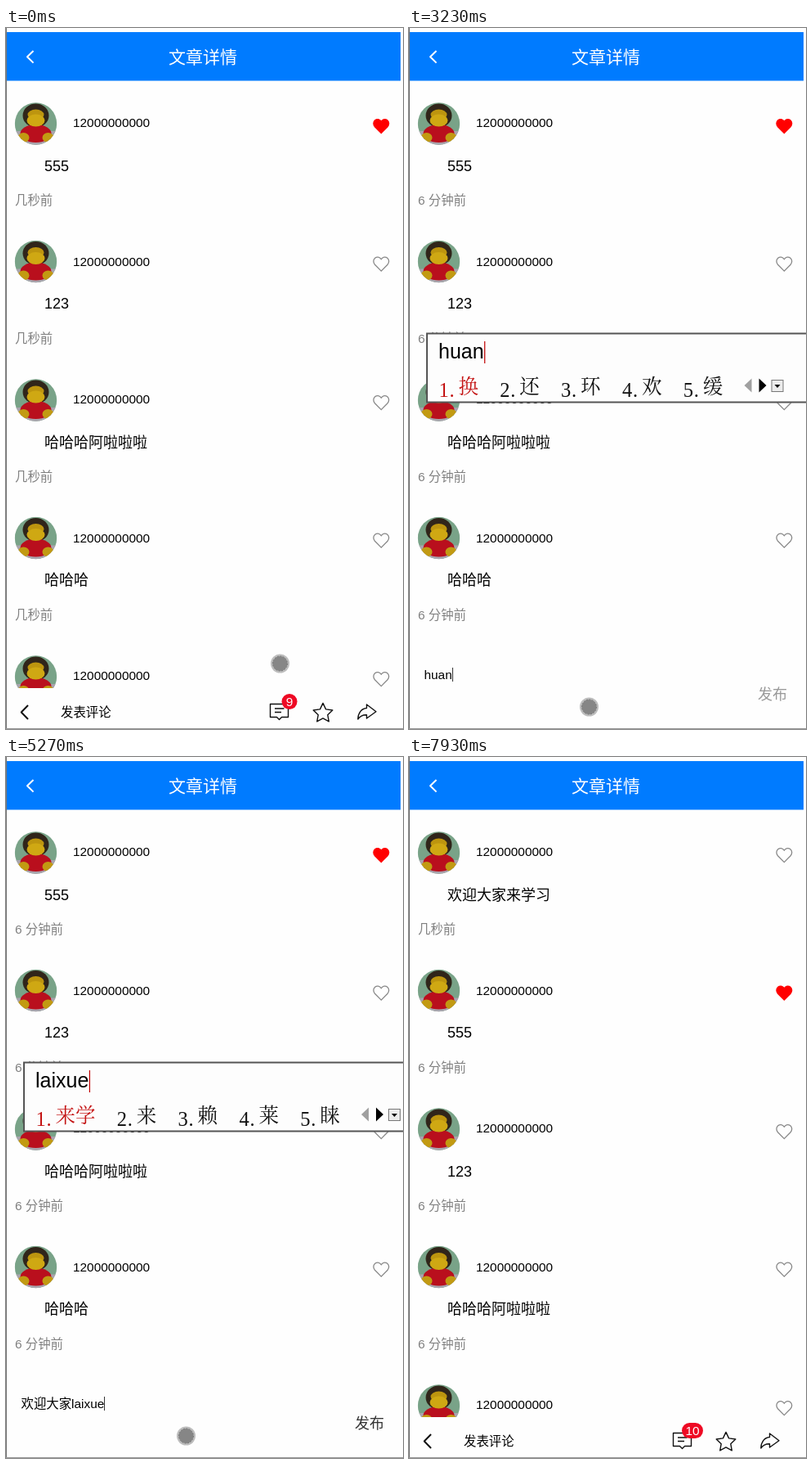
Write an HTML page that moves like this. It is 486 px wide and 857 px high and loops after 8000 ms.

```html
<!DOCTYPE html>
<html lang="zh-CN">
<head>
<meta charset="utf-8">
<style>
  html, body { margin: 0; width: 100%; height: 100%; overflow: hidden; background: #fefefe; }
  svg { display: block; width: 486px; height: 857px; }
  text { white-space: pre; font-family: "Liberation Sans", "Noto Sans CJK SC", "Noto Sans CJK", sans-serif; }
  .song { font-family: "Liberation Serif", "Noto Serif CJK SC", "Noto Sans CJK SC", serif; }
  .mono { font-family: "Liberation Mono", monospace; }
</style>
</head>
<body>
<svg id="stage" viewBox="0 0 486 857"></svg>
<script>
const LOOP = 8000;
const PITCH = 169;
const PHONE = '12000000000';
const SANS = '"Liberation Sans", "Noto Sans CJK SC", "Noto Sans CJK", sans-serif';
const HEART = 'M0 8.6L-7.8.7C-10-1.7-9.9-5.2-7.6-7.2C-5.2-9.2-1.9-8.6 0-5.9C1.9-8.6 5.2-9.2 7.6-7.2C9.9-5.2 10-1.7 7.8.7Z';
const stage = document.getElementById('stage');
const pen = document.createElement('canvas').getContext('2d');

// Each step overrides some fields of the state from its time on.
const ime = (keys, words) => ({ keys, words: words.split(' '), caret: true });
const shut = { keys: '', words: [] };
const steps = [
  [0, { cursor: [335.5, 777], age: ['几秒前', '几秒前'], typed: '', send: '#999', count: 9, ...shut }],
  [120, { cursor: [300, 793] }],
  [255, { cursor: [252, 815] }],
  [390, { cursor: [220.5, 830] }],
  [1530, { panel: true, age: ['5 分钟前', '6 分钟前'], caret: true, bar: 1 }],
  [1940, { bar: 0.4 }],
  [2090, { bar: 0, caret: false }],
  [2370, ime('h', '好 和 会 \\(^o^)/~ 后')],
  [2650, ime('hu', '湖 胡 户 护 虎')],
  [2800, ime('hua', '话 花 化 画 华')],
  [3230, { ...ime('huan', '换 还 环 欢 缓'), age: ['6 分钟前', '6 分钟前'] }],
  [3390, ime('huany', '欢迎 还有 换 还 环')],
  [3590, ime('huanying', '欢迎 幻影 换 还 环')],
  [3750, { ...shut, typed: '欢迎', send: '#777' }],
  [3900, { send: '#4c4c4c' }],
  [4020, { send: '#333' }],
  [4300, ime('d', '的 到 大 都 点')],
  [4420, ime('da', '大 打 达 答 搭')],
  [4580, { ...shut, typed: '欢迎大家' }],
  [4730, ime('l', '了 里 来 类 栏')],
  [4850, ime('la', '啦 拉 辣 蜡 腊')],
  [5000, ime('lai', '来 赖 莱 睐 徕')],
  [5120, ime('laix', '来 来信 来学 赖 莱')],
  [5270, ime('laixue', '来学 来 赖 莱 睐')],
  [5420, ime('laixuexi', '来学习 来学 来 赖 莱')],
  [5570, { ...shut, typed: '欢迎大家来学习' }],
  [5970, { caret: false }],
  [6370, { cursor: [362.5, 834], trail: true }],
  [6520, { cursor: [420, 824], trail: false }],
  [6640, { cursor: [446, 814] }],
  [6940, { panel: false, posted: true, count: 10 }],
  [7090, { cursor: [474, 815] }],
  [7230, { cursor: null }]
];

const stateAt = t => Object.assign({}, ...steps.filter(s => s[0] <= t).map(s => s[1]));
const esc = s => s.replace(/&/g, '&amp;').replace(/</g, '&lt;');
const text = (s, x, y, size, fill = '#000', extra = '') =>
  `<text x="${x}" y="${y}" font-size="${size}" fill="${fill}" ${extra}>${esc(String(s))}</text>`;
const rect = (x, y, w, h, fill, extra = '') =>
  `<rect x="${x}" y="${y}" width="${w}" height="${h}" fill="${fill}" ${extra}/>`;
const line = (d, stroke, width, fill = 'none') =>
  `<path d="${d}" fill="${fill}" stroke="${stroke}" stroke-width="${width}" stroke-linejoin="round"/>`;
const oval = (x, y, rx, ry, fill) =>
  `<ellipse cx="${x}" cy="${y}" rx="${rx}" ry="${ry}" fill="${fill}"/>`;

function widthOf(s, size) {
  pen.font = `${size}px ${SANS}`;
  return pen.measureText(s).width;
}

function avatar(y) {
  return `<g transform="translate(36.5 ${y})" clip-path="url(#round)">` +
    rect(-26, -26, 52, 52, '#79a388') + rect(-26, 9, 52, 18, '#a9a4ad') +
    oval(0, -10, 16, 14.5, '#30251a') + oval(0, 12, 19, 11, '#b90f1d') +
    oval(-15, 17, 7, 6, '#c29a12') + oval(15, 17, 7, 6, '#c29a12') +
    oval(0, -11, 10, 6.5, '#bd950f') + oval(0, -4, 11, 7.5, '#cfa813') + '</g>';
}

function comment(item, i) {
  const y = i * PITCH, odd = i % 2;
  const paint = item.liked ? 'fill="#f00" stroke="#f00"' : 'fill="none" stroke="#888"';
  return avatar(117 + y - odd * 0.5) +
    text(PHONE, 82, 121 + y + odd, 15.4) +
    `<path d="${HEART}" transform="translate(459.3 ${120 + y - odd * 0.5})" ${paint} stroke-width="1.3"/>` +
    text(item.body, 47, 175 + y - odd, 18) +
    text(item.age, 11, 216 + y, 15.4, '#808080');
}

function comments(s) {
  const [first, rest] = s.age;
  const list = [
    { body: '555', age: first, liked: true },
    { body: '123', age: rest },
    { body: '哈哈哈阿啦啦啦', age: rest },
    { body: '哈哈哈', age: rest },
    { body: '哈哈', age: rest }
  ];
  if (s.posted) list.unshift({ body: '欢迎大家来学习', age: '几秒前' });
  return list.slice(0, 5).map(comment).join('');
}

function star(x, y, r) {
  const points = Array.from({ length: 10 }, (_, i) => {
    const a = i * Math.PI / 5, k = i % 2 ? r * 0.49 : r;
    return `${(x + k * Math.sin(a)).toFixed(2)} ${(y - k * Math.cos(a)).toFixed(2)}`;
  });
  return line(`M${points.join('L')}Z`, '#111', 1.4);
}

function toolbar(count) {
  const w = count > 9 ? 26 : 19;
  return rect(1, 807, 485, 49, '#fefefe') +
    line('M27 828L18.7 836.5L27 845', '#111', 2) +
    text('发表评论', 67, 841.5, 15.4) +
    line('M323.5 826.5H345.5V842.5H337.5L334.5 845.5L331.5 842.5H323.5Z', '#111', 1.4) +
    line('M329 832H340.5M329 836.5H337', '#111', 1.4) +
    rect(347 - w / 2, 814, w, 19, '#ee0a24', 'rx="9.5"') +
    text(count, 347, 828.8, 15.4, '#fff', 'text-anchor="middle"') +
    star(388, 837.8, 12.4) +
    line('M441.5 827L453 835.7L441.5 844V839.7C436.5 839.5 433.5 841 430.8 845C431 837.5 435 832 441.5 831.5Z', '#111', 1.4);
}

function editor(s) {
  const value = s.typed + s.keys;
  const end = 18.5 + widthOf(value, 15.4);
  return rect(1, 750, 485, 106, '#fefefe') +
    (value ? text(value, 18.5, 796, 15.4) : text('友善评论、理性发言、阳光心灵', 18.5, 796, 15.4, '#808080')) +
    (s.caret ? rect(Math.round(end), 782, 1, 17, '#333') : '') +
    text('发布', 427, 821, 18, s.send) +
    (s.trail ? rect(209, 819, 166, 26, '#f8f8f8') : '') +
    (s.bar ? rect(474, 590, 3, 133, '#b4b4b4', `opacity="${s.bar}"`) : '');
}

function candidates(s) {
  const size = 24.5;
  let x = 36.5;
  let out = rect(22, 373.5, 480, 84, '#fdfdfd', 'stroke="#555" stroke-width="2"') +
    text(s.keys, 36, 404, 25) +
    rect(36.5 + widthOf(s.keys, 25), 383, 1.2, 27, '#c00000');
  s.words.forEach((word, i) => {
    const fill = i ? '#111' : '#c41414';
    const ascii = word.charCodeAt(0) < 128;
    out += text(i + 1, x, 451, size, fill, 'class="song"') + text('.', x + 13, 451, size, fill, 'class="song"') +
      (ascii ? text(word, x + size, 446, 20.4, fill, 'class="mono"')
             : text(word, x + size - 0.5, 446.5, size, fill, 'class="song" font-weight="300"'));
    x += size + word.length * (ascii ? size / 2 : size) + 25.8;
  });
  return out + `<g transform="translate(${x} 437)">` +
    '<path d="M9-8.5V8.5L0 0Z" fill="#a0a0a0"/><path d="M18-8.5V8.5L27 0Z"/>' +
    rect(33.5, -6.5, 14, 14, '#ececec', 'stroke="#777"') +
    '<path d="M37-1H44L40.5 3Z"/></g>';
}

function pointer([x, y]) {
  return oval(x, y, 11.5, 11.5, '#bdbdbd') +
    `<circle cx="${x}" cy="${y}" r="9" fill="#868686" stroke="#777" stroke-dasharray="2 1.5"/>`;
}

function draw(s) {
  stage.innerHTML = '<defs><clipPath id="round"><circle r="25.7"/></clipPath></defs>' +
    rect(0, 0, 486, 857, '#fefefe') +
    rect(1, 5, 482, 59.5, '#007bff') +
    line('M33.5 28L26 35.3L33.5 42.6', '#fff', 2) +
    text('文章详情', 241, 42.5, 21, '#fff', 'text-anchor="middle"') +
    comments(s) +
    (s.panel ? editor(s) : toolbar(s.count)) +
    (s.keys ? candidates(s) : '') +
    rect(0, 0, 1, 857, '#777') + rect(0, 856, 486, 1, '#999') +
    (s.cursor ? pointer(s.cursor) : '');
}

let shown = -1;
function tick() {
  const t = performance.now() % LOOP;
  const index = steps.filter(s => s[0] <= t).length;
  if (index !== shown) {
    shown = index;
    draw(stateAt(t));
  }
  requestAnimationFrame(tick);
}
tick();
</script>
</body>
</html>
```
